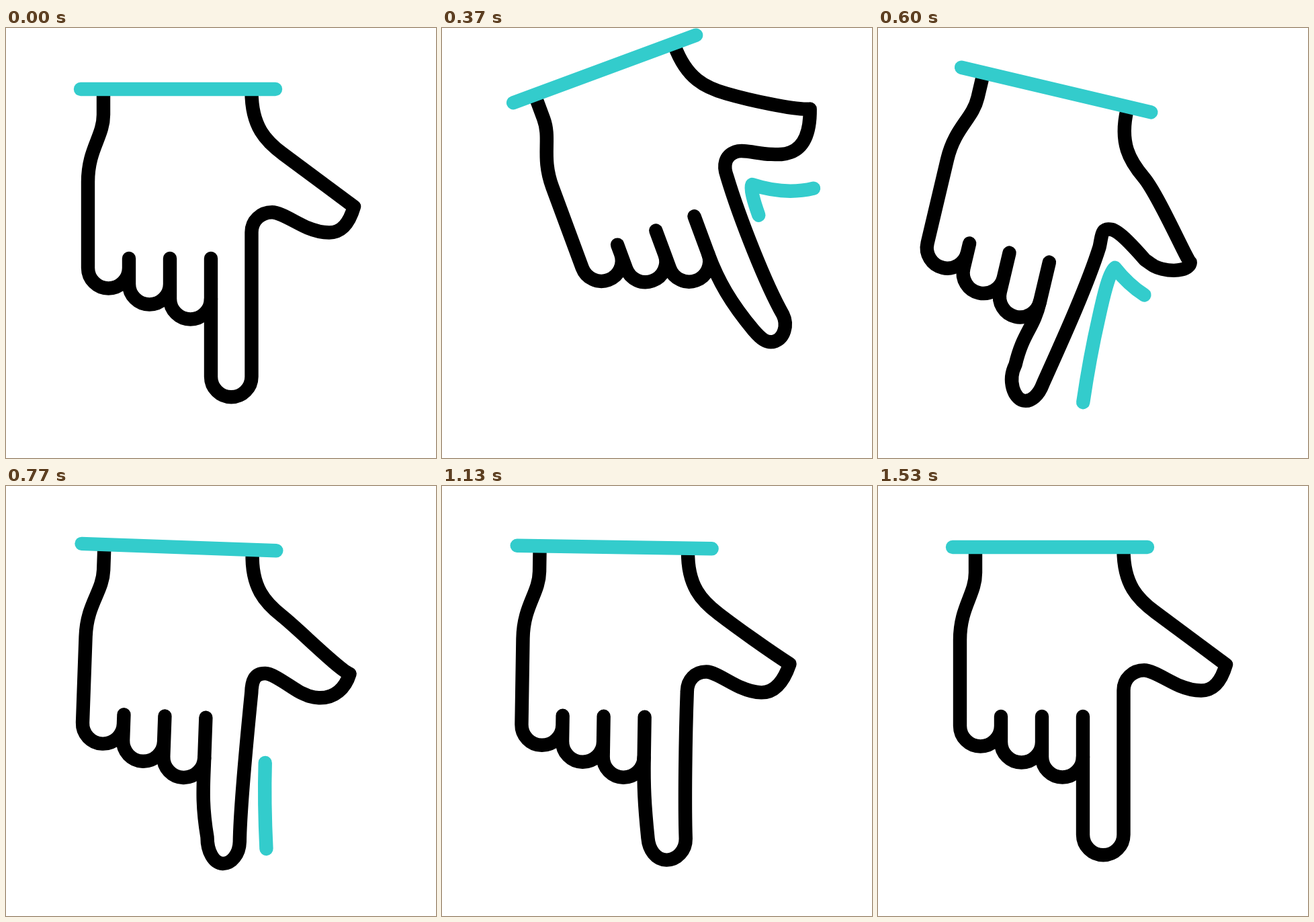
Write an HTML page with a canvas that moves like this. It is 640 px wide and 640 px high and loops after 1.67 s.

```html
<!DOCTYPE html>
<html lang="en">
<head>
<meta charset="utf-8">
<title>Pointing hand</title>
<style>
  html, body { margin: 0; width: 100%; height: 100%; overflow: hidden; background: #fff; }
  canvas { display: block; width: 640px; height: 640px; }
</style>
</head>
<body>
<canvas id="stage" width="640" height="640"></canvas>
<script>
const ctx = document.getElementById('stage').getContext('2d');
const LOOP = 1670, STEP = 100 / 3;
const PIVOT = { x: 256, y: 131 };
const TEAL = '#33cccc', TRAIL_LENGTH = 302;

// The hand eases between rest and the extremes of a dying swing.
// thumb and finger bend at their tips; pinch narrows and stretch lengthens the finger.
const rest = { angle: 0, lift: 0, thumb: 0, finger: 0, pinch: 0, stretch: 0 };
const poses = [
  { at: 2, ...rest },
  { at: 10, angle: -21.8, lift: -34, thumb: -15, finger: 20, pinch: 5.7, stretch: 10 },
  { at: 18, angle: 13.3, lift: 0, thumb: 29, finger: -21, pinch: 7, stretch: 3 },
  { at: 28, angle: -9.2, lift: 0, thumb: -20.5, finger: 26, pinch: 5, stretch: 17 },
  { at: 38, angle: 6.4, lift: 0, thumb: 3, finger: -5.5, pinch: 0.5, stretch: 0 },
  { at: 46, ...rest }
];

function ramp(from, to, v) {
  const p = Math.min(1, Math.max(0, (v - from) / (to - from)));
  return p * p * (3 - 2 * p);
}

function poseAt(step) {
  const next = Math.max(1, poses.findIndex(p => p.at > step));
  if (step >= poses[poses.length - 1].at) return rest;
  const a = poses[next - 1], b = poses[next], mix = ramp(a.at, b.at, step);
  const pose = {};
  for (const key in rest) pose[key] = a[key] + (b[key] - a[key]) * mix;
  return pose;
}

const palm = new Path2D(`
  M145 95 V129 C145 162 122 180 122 229 V357
  A30.5 30.5 0 0 0 183 357 V343
  M183 357 V381 A30.5 30.5 0 0 0 244 381 V343
  M244 381 V403 A30.5 30.5 0 0 0 305 403`);
const cuff = new Path2D('M111 91 H401');
const trail = new Path2D(`
  M486 365.5 C456 362 428 349 402 328.5
  C395 335 395 375 395.7 407 C396 450 399 500 402 535`);

function indexFinger({ finger, pinch, stretch }) {
  const left = 305 + finger + pinch, leftY = 519 + 0.75 * finger;
  const right = 365.5 + finger - pinch, rightY = 519 + 0.7 * stretch;
  const mid = (left + right) / 2, bottom = 549.3 + stretch;
  const round = 0.55 * (right - mid);
  return `M305 343 V404
    C305 445 ${left - finger / 2 - 1.5 * pinch} ${leftY - 50} ${left} ${leftY}
    C${left + 0.3 * finger} ${leftY + 0.55 * (bottom - leftY)} ${mid - round} ${bottom} ${mid} ${bottom}
    C${mid + round} ${bottom} ${right + 0.1 * finger} ${rightY + 0.55 * (bottom - rightY)} ${right} ${rightY}
    C${right - 0.45 * finger} ${rightY - 50} ${365.5 + 0.3 * pinch} 370 ${365.5 + pinch} 304`;
}

function thumbOutline({ thumb, pinch }) {
  const corner = 365.5 + pinch, web = 396 - 0.6 * pinch - 0.25 * thumb;
  const tipX = 518 - 0.3 * thumb, tipY = 266 + thumb;
  const drop = 0.25 * thumb + 0.35 * pinch, shift = 1.5 * pinch;
  const under = 304.5 + drop;
  return `C${corner} 287 ${web - 17} 274.3 ${web} 274.3
    C${web + 12} 274.3 ${430 - shift / 2} ${289 + drop / 2} ${448 - shift / 2} ${297 + drop}
    C${460 - shift / 2} ${under - 2.5} ${470 - shift} ${under} ${481 - shift} ${under}
    C${500 - shift / 2} ${under} 511 ${290 + thumb / 2} ${tipX} ${tipY}
    C${483 + 3 * pinch} ${tipY - 26 + 3.5 * pinch} 440 208 413 188
    C387 169 365.5 147 365.5 95`;
}

function draw(step) {
  const pose = poseAt(step);

  ctx.setTransform(1, 0, 0, 1, 0, 0);
  ctx.fillStyle = '#fff';
  ctx.fillRect(0, 0, 640, 640);
  ctx.translate(PIVOT.x, PIVOT.y + pose.lift);
  ctx.rotate(pose.angle * Math.PI / 180);
  ctx.translate(-PIVOT.x, -PIVOT.y);
  ctx.lineWidth = 20.4;
  ctx.lineCap = ctx.lineJoin = 'round';

  const head = ramp(4, 18.7, step), tail = ramp(15, 29.6, step);
  ctx.strokeStyle = TEAL;
  if (head > tail) {
    ctx.setLineDash([TRAIL_LENGTH * (head - tail), 999]);
    ctx.lineDashOffset = -TRAIL_LENGTH * tail;
    ctx.stroke(trail);
    ctx.setLineDash([]);
  }

  ctx.strokeStyle = '#000';
  ctx.stroke(palm);
  ctx.stroke(new Path2D(indexFinger(pose) + thumbOutline(pose)));
  ctx.strokeStyle = TEAL;
  ctx.stroke(cuff);
}

function tick() {
  const t = performance.now() % LOOP;
  draw(Math.floor((t + 5) / STEP));
  requestAnimationFrame(tick);
}
tick();
</script>
</body>
</html>
```
